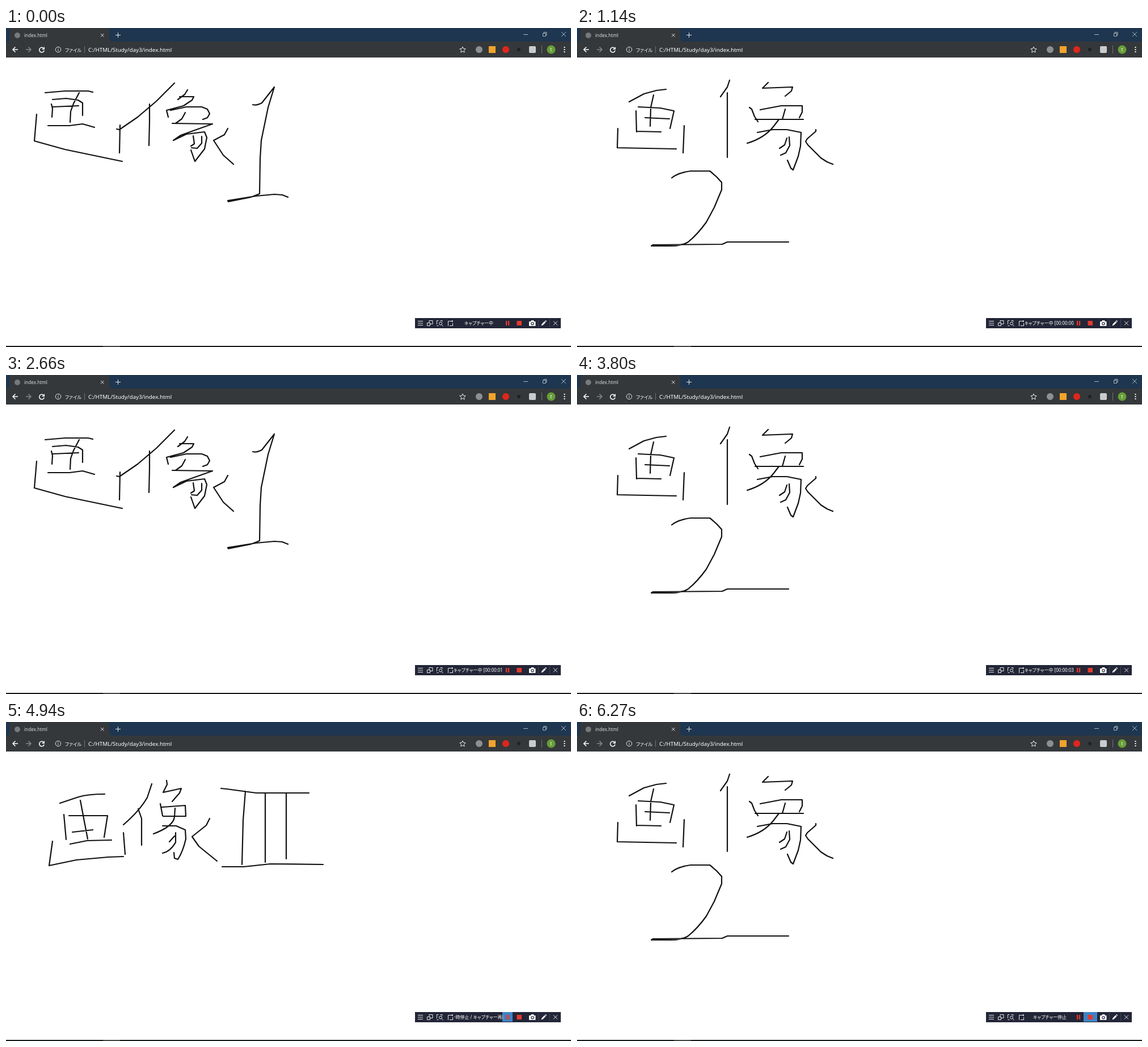
An HTML page for the animation above (6.46 s loop, 996x562 px).

```html
<!DOCTYPE html>
<html lang="ja">
<head>
<meta charset="utf-8">
<title>index.html</title>
<style>
  html, body { margin: 0; width: 100%; height: 100%; overflow: hidden; background: #fff; }
  svg { display: block; width: 100vw; height: 100vh; }
  text { font-family: "Noto Sans", "Noto Sans CJK JP", sans-serif; font-feature-settings: "palt"; fill: #fff; }
  .line { fill: none; stroke: #e8eaed; stroke-width: 1; }
  #drawing { fill: none; stroke: #111; stroke-width: 2.2; stroke-linecap: round; stroke-linejoin: round; }
</style>
</head>
<body>
<svg viewBox="0 0 996 562">
  <!-- browser window -->
  <rect width="996" height="25" fill="#1e364f"/>
  <path d="M0 24Q6 24 6 18V6Q6 0 12 0H176Q182 0 182 6V18Q182 24 188 24H996V52H0Z" fill="#35383b"/>
  <circle cx="20" cy="13" r="5" fill="#777a7d"/>
  <text x="32" y="16" font-size="8.2" style="fill:#d8dadc">index.html</text>
  <path class="line" d="M167 10l5.5 5.5m0-5.5l-5.5 5.5M193 12.5h9m-4.500-4.500v9" stroke-width="1.300"/>
  <path class="line" style="stroke:#a9b4be" d="M912 11.500h8M946.500 9.500h5v5h-5zM948 9.500v-2h5v5h-1.500M979 7l8 8m0-8l-8 8"/>
  <path class="line" style="stroke:#fff;stroke-width:1.500" d="M21 38h-9m4.500-4.500L12 38l4.500 4.500"/>
  <path class="line" style="stroke:#85888b;stroke-width:1.500" d="M35 38h9m-4.500-4.500L44 38l-4.500 4.500"/>
  <path class="line" style="stroke:#fff;stroke-width:1.500" d="M66 35.500A4.300 4.300 0 1 0 67.200 39.500"/>
  <path d="M68 33v5h-5z" fill="#fff"/>
  <circle class="line" cx="92" cy="38" r="4.700"/>
  <path class="line" d="M92 37.500v3M92 35v1.200"/>
  <text x="104" y="41.500" font-size="8.500">ファイル</text>
  <path class="line" style="stroke:#707376" d="M138.500 32v12M944.500 31v14"/>
  <text x="145" y="41.500" font-size="9.800">C:/HTML/Study/day3/index.html</text>
  <path class="line" d="M805 33l1.500 3.400 3.700.4-2.800 2.500.8 3.700-3.200-1.900-3.200 1.900.8-3.700-2.800-2.500 3.700-.4z"/>
  <circle cx="834" cy="38" r="6" fill="#8d9093"/>
  <rect x="851" y="32" width="12" height="12" fill="#f2a32c"/>
  <circle cx="881" cy="38" r="6" fill="#e0261c"/>
  <circle cx="904" cy="38" r="3" fill="#1f2123"/>
  <rect x="922" y="32" width="12" height="12" rx="2" fill="#c9cbcd"/>
  <circle cx="961" cy="38" r="7.500" fill="#679f38"/>
  <text x="961" y="41" font-size="8" text-anchor="middle">t</text>
  <path d="M983.500 33h2v2h-2zm0 4h2v2h-2zm0 4h2v2h-2z" fill="#fff"/>
  <rect y="560" width="996" height="2" fill="#15181b"/>
  <rect x="171" y="560" width="30" height="2" fill="#444"/>

  <path id="drawing"/>

  <!-- recorder bar -->
  <rect x="721" y="511" width="257" height="18" fill="#232637"/>
  <rect id="hover" y="511" height="17" width="18" fill="#3f83c6"/>
  <g class="line">
    <path d="M726 516.500h9m-9 3.500h9m-9 3.500h9"/>
    <path d="M742.500 519.500h5v5h-5zM746 519.500v-4h6v6h-4"/>
    <path d="M759.500 522v-6.500h3m3 0h3.500v2M759.500 524.500h3M768 523l2.500 2"/>
    <circle cx="766" cy="520.500" r="2.500"/>
    <path d="M779.500 525v-8.500h8M786 515l2 1.500-2 1.500M787.500 520v4.500H782"/>
    <path d="M938.500 513v14M958.500 513v14" style="stroke:#41455a"/>
    <path d="M965 516.500l7 7m0-7l-7 7"/>
  </g>
  <path d="M922 517h3l1-2h4l1 2h2.500v8H922z" fill="#fff"/>
  <circle cx="928" cy="520.700" r="2.200" fill="#fff" stroke="#232637" stroke-width="1.200"/>
  <path d="M943.500 524.500l1-3 5-5 2 2-5 5zM950.200 515.800l1-1 2 2-1 1z" fill="#fff"/>
  <path d="M881 516h2.300v8H881zm3.900 0h2.300v8h-2.300zM900.500 516h8.500v8h-8.500z" fill="#e43a2c"/>
  <clipPath id="statusBox"><rect x="790" y="511" width="86" height="18"/></clipPath>
  <g clip-path="url(#statusBox)">
    <text id="status" x="833.500" y="523" font-size="8" font-weight="500" text-anchor="middle"></text>
  </g>
</svg>
<script>
const drawings = {
  one: `M69 114L104 111H145L153 113 M82 126L106 124L127 127L135 132L135 154 M80 134L82 142L81 157
    M82 139L128 137 M129 114L119 133L114 147L113 166 M74 172H112L135 169L156 175
    M54 152L50 199L104 214L205 235 M201 171L200 220 M195 178L200 179L232 157L265 129L297 97
    M253 134V165L252 207 M320 109L315 117L303 126 M306 121L331 121L328 127L313 137L283 145L286 157
    M290 145L318 139L345 139L355 143L359 151L355 158L347 161 M316 149L310 160L299 168
    M293 168L364 169L333 180L308 189L295 198L318 187L350 183L354 193L350 213L333 235L326 215
    M330 190L332 204L326 208 M345 191L345 203L337 212L327 211
    M391 177L385 188L366 198L383 224L401 240
    M435 135Q442 137 451 132L473 104L462 140L450 198L448 230L447 292L432 298L392 306L391 304L441 296L473 293L487 294L497 298`,
  two: `M92 130L118 116L140 110L157 108 M135 118L130 140L129 173 M104 146L105 183
    M108 139L147 141L171 146L164 177 M120 158L163 160 M105 182L148 183
    M72 177L71 211L175 213 M189 172L187 220 M269 92L265 104L253 121 M265 114V228
    M337 96L327 106L380 104L378 111L367 120 M304 140L308 143L313 156L319 165
    M323 144L360 137H397V148L392 158 M367 143L362 161 M314 161H399
    M356 161L346 174Q330 194 300 203
    M318 184L345 179L370 179L395 184L394 208L390 226L381 250L377 247L371 233
    M370 194L366 206L357 212 M374 192L375 207L368 220L359 224
    M421 179V182L406 195L403 200L407 206L430 229L441 236L451 240
    M167 264Q178 255 200 252H234Q246 261 255 272V285L242 316L228 342Q213 363 196 377Q185 384 165 384H131L134 382L256 381L265 377H373`,
  three: `M95 143L128 132Q145 127 174 127 M102 163L106 207 M111 165H179L173 203
    M131 138L138 175L144 206 M117 194L153 190 M113 215L143 209L186 208
    M82 210L76 253L124 243L180 238L207 237 M207 195L210 233
    M257 109L249 133Q236 156 207 181 M233 153L239 170V217
    M283 103L284 110L277 124L309 117L306 125L293 140 M272 144L276 165
    M275 150L316 147L317 166H277 M298 152L297 167Q295 184 260 197
    M276 183H300L316 190L317 206Q312 228 303 242L297 240L296 230
    M297 201L288 211 M299 195V212Q290 228 276 231
    M359 170L353 182L328 202L340 219L372 245
    M379 117L389 118L441 125H534 M422 122L418 173L416 251 M457 125V247 M494 125V241
    M381 255H419L466 250L559 251`
};

const LOOP = 6460;
const since = (steps, t) => steps.findLast(([start]) => start <= t)[1];
const counter = s => `キャプチャー中 [00:00:0${s}]`;
const pauseHint = "一時停止 / キャプチャー再開";

const pictures = [[0, "one"], [760, "two"], [1520, "three"], [2660, "one"],
  [3800, "two"], [4940, "three"], [5320, "one"], [6270, "two"]];
const messages = [[0, "キャプチャー中"], [380, pauseHint], [1140, counter(0)], [2280, counter(1)],
  [3420, counter(2)], [3800, counter(3)], [4560, pauseHint], [5320, "キャプチャー停止"]];
const buttons = { pause: [875, 18], stop: [893, 24], none: [0, 0] };
const hovers = [[0, "none"], [380, "pause"], [1140, "none"], [4560, "pause"], [5320, "stop"]];

const [drawing, status, hover] = ["drawing", "status", "hover"].map(id => document.getElementById(id));

function render() {
  const t = performance.now() % LOOP;
  const [x, width] = buttons[since(hovers, t)];
  drawing.setAttribute("d", drawings[since(pictures, t)]);
  status.textContent = since(messages, t);
  hover.setAttribute("x", x);
  hover.setAttribute("width", width);
  requestAnimationFrame(render);
}
render();
</script>
</body>
</html>
```
